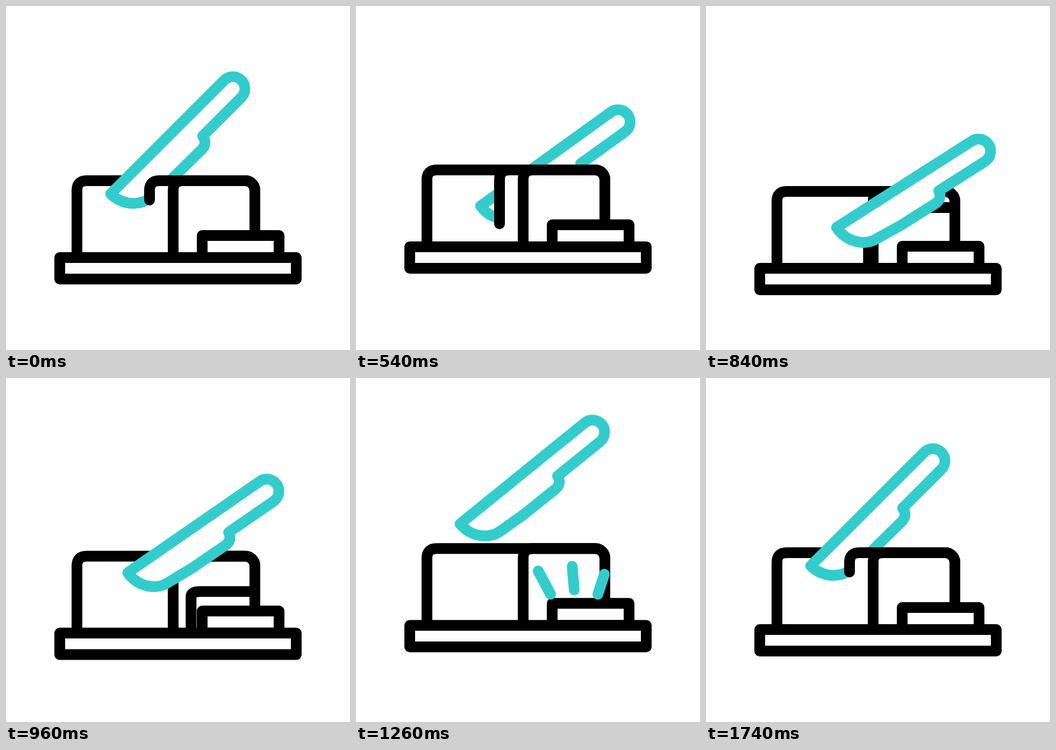
An HTML page with a canvas that plays this animation: 640 by 640 pixels, repeating every 2.06 s.

```html
<!DOCTYPE html>
<html lang="en">
<head>
<meta charset="utf-8">
<title>Slicing</title>
<style>
  html, body { margin: 0; width: 100%; height: 100%; overflow: hidden; background: #fff; }
  canvas { display: block; width: 640px; height: 640px; }
</style>
</head>
<body>
<canvas id="stage" width="640" height="640"></canvas>
<script>
const ctx = document.getElementById('stage').getContext('2d');
const LOOP = 2060, INK = '#000', BLUE = '#33cccd', PAPER = '#fff';
const LEFT = 132, CUT = 267, EDGE = 311, RIGHT = 463;
const TOP = 325, BASE = 462, SLAB_TOP = 427, R = 18;

const clamp = x => Math.max(0, Math.min(1, x));
const span = (t, from, to) => clamp((t - from) / (to - from));
const mix = (a, b, p) => a + (b - a) * p;
const cubic = p => p < 0.5 ? 4 * p ** 3 : 1 - 4 * (1 - p) ** 3;
const rad = deg => deg * Math.PI / 180;

// Knife poses: handle centre and tilt
const REST = { x: 422, y: 154, tilt: 45 };
const DEEP = { x: 518, y: 273.5, tilt: 31.5 };
const HIGH = { x: 440, y: 108.5, tilt: 39 };

function blend(a, b, p) {
  return { x: mix(a.x, b.x, p), y: mix(a.y, b.y, p), tilt: mix(a.tilt, b.tilt, p) };
}

function knifePose(t) {
  const down = blend(REST, DEEP, span(t, 200, 700));
  const up = blend(down, HIGH, span(t, 780, 1210));
  return blend(up, REST, span(t, 1315, 1740));
}

// Five equal swings: rest, up, down, up, down, rest
function bob(t) {
  const swing = span(t, 220, 1740) * 5, n = Math.floor(swing);
  const turn = k => k % 5 ? 20 * (-1) ** k : 0;
  return mix(turn(n), turn(n + 1), cubic(swing - n));
}

function cutEnd(t) {
  return t < 740 ? mix(361, 455, span(t, 200, 700)) : mix(TOP, 361, span(t, 1440, 1740));
}

function stroke(path, color = INK) {
  ctx.strokeStyle = color;
  ctx.stroke(path);
}

function fill(path) {
  ctx.fillStyle = PAPER;
  ctx.fill(path);
}

function box(x, y, right, bottom) {
  const path = new Path2D();
  path.rect(x, y, right - x, bottom - y);
  return path;
}

// An open-bottomed panel with round upper corners
function panel(left, top, bottom, r = R) {
  return new Path2D(
    `M${left} ${bottom}V${top + r}Q${left} ${top} ${left + r} ${top}` +
    `H${RIGHT - R}A${R} ${R} 0 0 1 ${RIGHT} ${top + R}V${BASE}`);
}

const block = panel(LEFT, TOP, BASE);
const side = panel(EDGE, TOP, BASE);
const slab = box(365, SLAB_TOP, 508, 468);
const board = box(100, 468, 540, 508);

// Along x: from the handle centre to the tip; y: towards the cutting edge
const blade = new Path2D(
  'M0 -22.5H299Q298.6 2.9 281 20.5Q268.5 33 252 35L198 38.5L121 39' +
  'Q104.5 39 102 22.5H0A22.5 22.5 0 0 1 0 -22.5Z');

function drawFace(end) {
  const face = panel(CUT, TOP, end, Math.min(R, end - TOP));
  const mask = new Path2D(face);
  mask.lineTo(CUT, BASE);
  mask.lineTo(CUT, end);
  fill(mask);
  stroke(face);
}

function drawKnife(t) {
  const { x, y, tilt } = knifePose(t);
  const c = Math.cos(rad(tilt)), s = Math.sin(rad(tilt));
  ctx.save();
  ctx.transform(-c, s, s, c, x, y);
  fill(blade);
  stroke(blade, BLUE);
  ctx.restore();
}

function drawSlice(t) {
  const p = span(t, 740, 1083);
  if (p === 0 || p === 1) return;
  const x = mix(CUT, 387, p), y = mix(TOP, SLAB_TOP, p), r = mix(R, 4, p);
  stroke(new Path2D(`M${x} ${BASE}V${y + r}Q${x} ${y} ${x + R} ${y}H${RIGHT}V${BASE}`));
}

function drawSparks(t) {
  const head = span(t, 1100, 1240), tail = span(t, 1270, 1420);
  if (head === 0 || tail === 1) return;
  for (let i = -1; i <= 1; i++) {
    const x = 406 + 44 * i, y = 402 + 8 * Math.abs(i);
    const angle = rad(23 * i - 5), length = 44 - 5 * i;
    const line = new Path2D();
    for (const p of [tail, head])
      line.lineTo(x + Math.sin(angle) * length * p, y - Math.cos(angle) * length * p);
    stroke(line, BLUE);
  }
}

function draw(t) {
  const inside = t < 780 || t >= 1320;
  ctx.setTransform(1, 0, 0, 1, 0, 0);
  ctx.fillStyle = PAPER;
  ctx.fillRect(0, 0, 640, 640);
  ctx.translate(0, bob(t));
  ctx.lineWidth = 20;
  ctx.lineCap = ctx.lineJoin = 'round';

  stroke(block);
  if (inside) {
    drawKnife(t);
    drawFace(cutEnd(t));
  }
  stroke(side);
  drawSlice(t);
  for (const part of [slab, board]) {
    fill(part);
    stroke(part);
  }
  if (!inside) drawKnife(t);
  drawSparks(t);
}

const start = performance.now();
function tick() {
  draw((performance.now() - start) % LOOP);
  requestAnimationFrame(tick);
}
tick();
</script>
</body>
</html>
```
